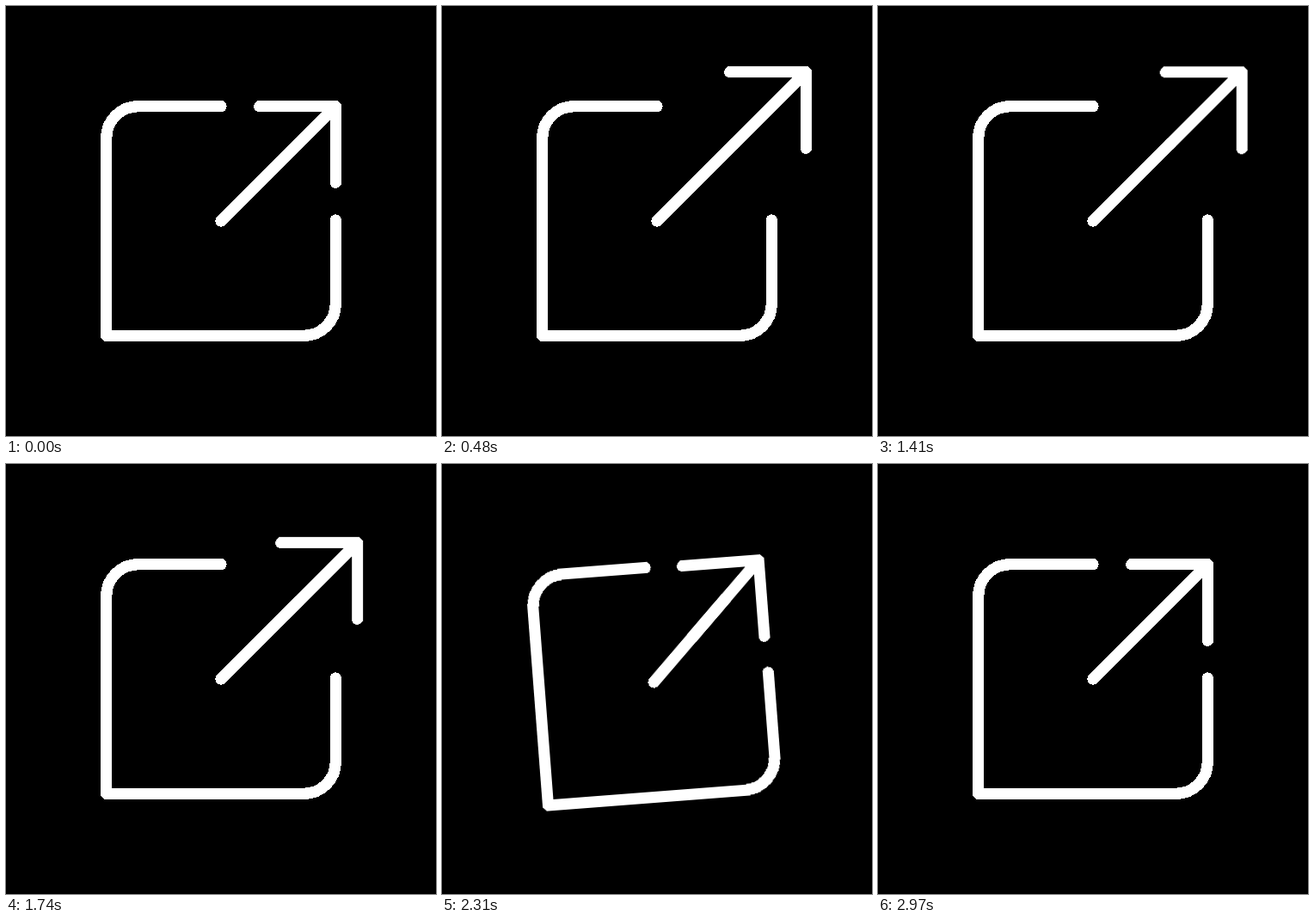
These frames come from a looping animation (500x500 px, 5090 ms). An HTML page without scripts:

```html
<!DOCTYPE html>
<html lang="en">
<head>
<meta charset="utf-8">
<title>Open link icon</title>
<style>
  html, body {
    margin: 0;
    width: 100%;
    height: 100%;
    overflow: hidden;
    background: #000;
  }
  svg {
    display: block;
    width: 100%;
    height: 100%;
    fill: none;
    stroke: #fff;
    stroke-width: 13.33;
    stroke-linecap: round;
    stroke-linejoin: round;
    shape-rendering: crispEdges; /* hard, unsmoothed edges */
  }
  .recoil, .tilt, .arrow {
    animation: 5090ms cubic-bezier(.36, 0, .64, 1) infinite;
  }
  .recoil { animation-name: recoil; }
  .tilt { animation-name: tilt; transform-origin: 250px 250px; }
  .arrow { animation-name: arrow; }

  /* whole icon pulls back before launch, and again when the arrow lands */
  @keyframes recoil {
    0%, 8.84%, 37.13%, 58.35%, 100% { transform: translate(0, 0); }
    4.42%, 42.44% { transform: translate(-10px, 10px); }
    49.51% { transform: translate(7px, -7px); }
  }
  @keyframes tilt {
    0%, 38.9%, 49.51%, 100% { transform: rotate(0deg); }
    44.2% { transform: rotate(-5deg); }
  }
  /* fly out, hover, snap back */
  @keyframes arrow {
    0%, 4.42%, 47.15%, 100% { transform: translate(0, 0); }
    8.84% { transform: translate(40px, -40px); }
    17.68% { transform: translate(33.3px, -33.3px); }
    26.52% {
      transform: translate(40px, -40px);
      animation-timing-function: cubic-bezier(.5, 0, .8, .52);
    }
    39.49% { transform: translate(-10px, 10px); }
  }
</style>
</head>
<body>
<svg viewBox="0 0 500 500">
  <g class="recoil">
    <g class="tilt">
      <path d="M250 116.67H153.67A37 37 0 0 0 116.67 153.67V383.33H346.33A37 37 0 0 0 383.33 346.33V249"/>
      <!-- fixed root of the shaft; the moving part slides over it -->
      <path d="M250 250L340 160"/>
      <path class="arrow" d="M294.8 116.67H383.33V205.2M383.33 116.67L300 200"/>
    </g>
  </g>
</svg>
</body>
</html>
```
